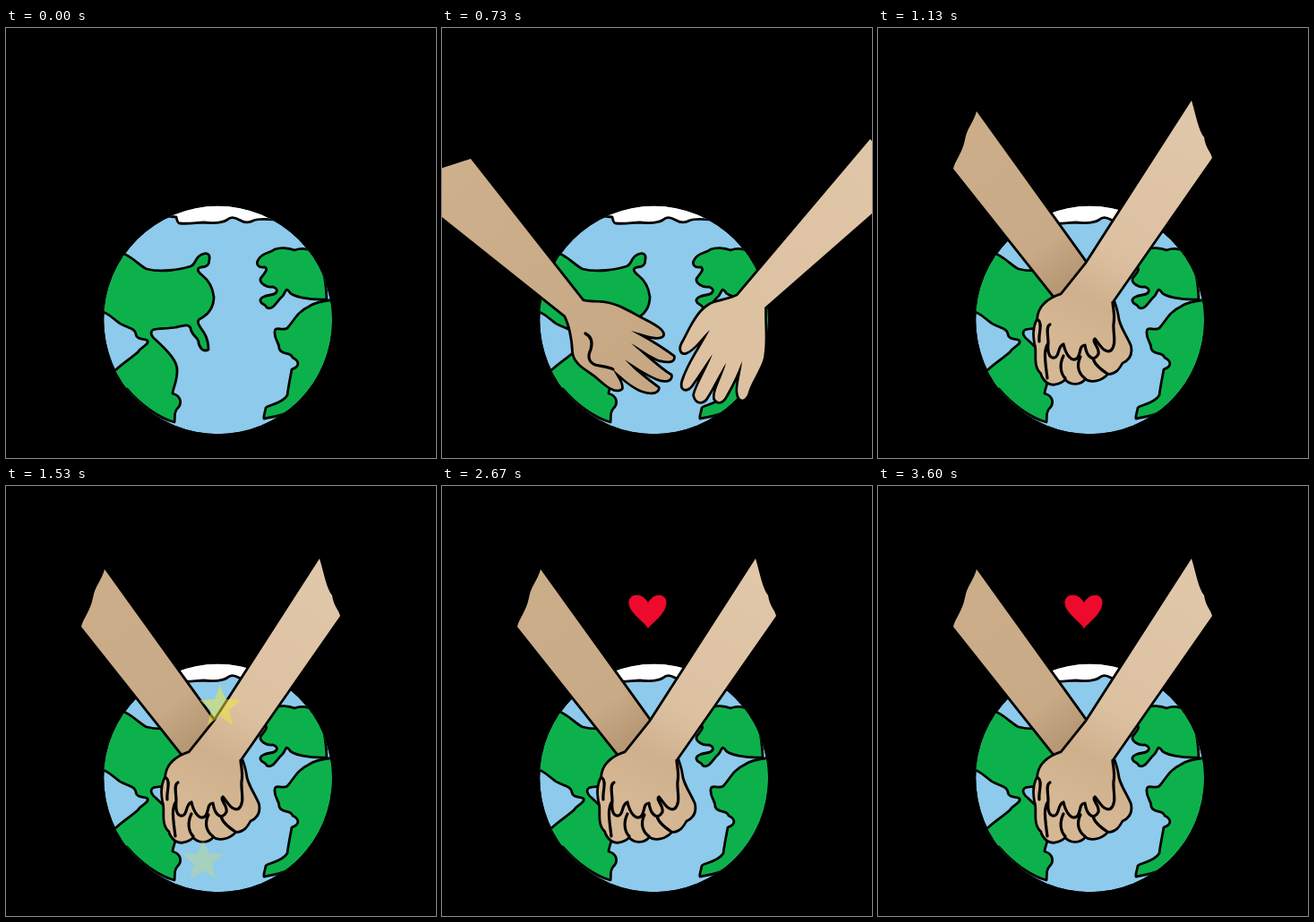
Recreate the animation shown at these times as an HTML page. Size 480 px wide and 480 px high, loop 3990 ms.

```html
<!DOCTYPE html>
<html lang="en">
<head>
<meta charset="utf-8">
<title>Holding hands over the Earth</title>
<style>
html, body { margin: 0; width: 100%; height: 100%; overflow: hidden; background: #000; }
svg { display: block; width: 100vw; height: 100vh; }
path { stroke-linecap: round; stroke-linejoin: round; }
.land path { fill: #0db14b; stroke: #000; stroke-width: 2.8; }
.arm { stroke: #000; stroke-width: 5.6; paint-order: stroke; }
.left { fill: url(#tan); }
.right { fill: url(#sand); }
.line { fill: none; stroke: #000; stroke-width: 3.2; }
.reach, .rest, .cover, .clasp, .heart, .star { animation: 3990ms step-end infinite; }
.slide { animation: 3990ms step-end infinite; }

/* One pose at a time */
.reach { animation-name: reach; }
.rest { animation-name: rest; }
.cover { animation-name: cover; }
.clasp { animation-name: clasp; }
@keyframes reach { 0%, 14.91%, 100% { visibility: hidden } 6.64% { visibility: visible } }
@keyframes rest { 0%, 21.68%, 100% { visibility: hidden } 14.91% { visibility: visible } }
@keyframes cover { 0%, 24.94%, 100% { visibility: hidden } 21.68% { visibility: visible } }
@keyframes clasp { 0% { visibility: hidden } 24.94%, 100% { visibility: visible } }

/* Stepped travel inside each pose */
.reach-l { animation-name: reach-l; }
.reach-r { animation-name: reach-r; }
.rest-l { animation-name: rest-l; }
.rest-r { animation-name: rest-r; }
.cover-l { animation-name: cover-l; }
.cover-r { animation-name: cover-r; }
.clasp-l { animation-name: clasp-l; }
@keyframes reach-l {
  0% { transform: translate(-120px, -42px) }
  8.15% { transform: translate(-80px, -28px) }
  9.9% { transform: translate(-38px, -13px) }
  11.65% { transform: none }
  13.16%, 100% { transform: translate(32px, 10px) }
}
@keyframes reach-r {
  0% { transform: translate(95px, -30px) }
  8.15% { transform: translate(62px, -20px) }
  9.9% { transform: translate(30px, -10px) }
  11.65% { transform: none }
  13.16%, 100% { transform: translate(-24px, 8px) }
}
@keyframes rest-l {
  0% { transform: translate(-44px, -20px) }
  16.67% { transform: translate(-20px, -9px) }
  18.17% { transform: none }
  19.92%, 100% { transform: translate(19px, -9px) }
}
@keyframes rest-r {
  0% { transform: translate(42px, -20px) }
  16.67% { transform: translate(20px, -9px) }
  18.17% { transform: none }
  19.92%, 100% { transform: translate(-27px, -6px) }
}
@keyframes cover-l { 0% { transform: none } 23.18%, 100% { transform: translate(14px, -9px) } }
@keyframes cover-r { 0% { transform: none } 23.18%, 100% { transform: translate(-12px, -5px) } }
@keyframes clasp-l { 0% { transform: translate(-7px, 1px) } 26.69%, 100% { transform: none } }

.star { fill: #f4e93c; opacity: 0; animation-name: twinkle; }
@keyframes twinkle {
  0%, 44.99%, 100% { opacity: 0 }
  33.2%, 43.23% { opacity: .12 }
  34.96%, 41.73% { opacity: .28 }
  36.72%, 39.97% { opacity: .42 }
  38.22% { opacity: .5 }
}

.heart { animation-name: show; }
.rise { animation: rise 3990ms linear infinite; }
@keyframes show { 0% { visibility: hidden } 46.74%, 100% { visibility: visible } }
@keyframes rise {
  0% { transform: translateY(126px) }
  45% { transform: translateY(126px); animation-timing-function: steps(12, jump-start) }
  65%, 100% { transform: none }
}
</style>
</head>
<body>
<svg viewBox="0 0 480 480">
  <defs>
    <clipPath id="disc"><circle cx="236.5" cy="326" r="127.3"/></clipPath>
    <linearGradient id="tan" x1="0" y1="0" x2="1" y2="1">
      <stop offset="0" stop-color="#cfb08c"/><stop offset="1" stop-color="#c6a783"/>
    </linearGradient>
    <linearGradient id="sand" x1="1" y1="0" x2="0" y2="1">
      <stop offset="0" stop-color="#e0c7a9"/><stop offset="1" stop-color="#dcc09f"/>
    </linearGradient>
    <linearGradient id="shade" gradientUnits="userSpaceOnUse" x1="100" y1="120" x2="215" y2="280">
      <stop offset="0" stop-color="#cbad89"/><stop offset=".75" stop-color="#c8aa86"/><stop offset="1" stop-color="#b79874"/>
    </linearGradient>
    <linearGradient id="fist" gradientUnits="userSpaceOnUse" x1="345" y1="100" x2="215" y2="350">
      <stop offset="0" stop-color="#e0c7a9"/><stop offset=".6" stop-color="#dcc1a1"/><stop offset=".82" stop-color="#cfb08d"/><stop offset="1" stop-color="#d5b794"/>
    </linearGradient>
    <path id="spark" d="M0-24 6-8 23-7 10 4 14 21 0 11-14 21-10 4-23-7-6-8Z"/>
  </defs>

  <g class="land" clip-path="url(#disc)">
    <circle cx="236.5" cy="326" r="127.3" fill="#8dcaeb"/>
    <path style="fill:#fff" d="M170 209 190 211C191 214 191 218 194 218C205 219 213 217 221 217C230 218 241 218 247 214C251 210 255 211 260 214C265 217 271 218 276 215C284 212 291 214 305 214L300 180H170Z"/>
    <path d="M125 249C142 255 147 264 157 269C172 273 194 270 206 266C212 264 211 256 218 253C224 250 228 252 227 258C227 264 225 267 218 267C212 268 214 272 219 276C228 283 231 292 232 300C232 312 226 320 216 325C212 328 216 333 221 340C224 345 226 352 226 359C220 362 217 358 215 352C216 346 207 344 206 335C203 329 198 333 190 334C180 336 170 335 164 337C160 340 163 345 167 348C180 360 192 372 191 383C191 395 186 403 186 408C197 411 196 421 191 425C187 430 189 435 188 440C172 436 150 421 135 403L90 400 120 384C128 376 139 369 147 362C151 355 160 354 158 349C155 346 146 349 145 342C144 334 132 334 126 329C120 325 116 319 104 315L95 260Z"/>
    <path d="M342 250C335 245 328 246 322 248C315 245 305 245 300 247C294 252 287 250 282 258C278 264 282 268 289 267C294 270 286 276 284 280C283 285 291 290 298 289C306 292 302 297 295 298C289 299 283 301 284 305C285 309 290 308 291 312C298 316 302 305 309 299C313 293 312 290 316 294C318 300 340 304 358 303C357 285 357 270 342 250Z"/>
    <path d="M370 303C355 304 345 306 338 311C325 317 322 326 314 335C308 339 299 331 300 341C300 348 305 351 305 358C308 366 318 361 320 368C328 372 328 378 319 381C317 392 315 402 314 410C308 420 291 421 290 424C289 430 287 434 288 436C300 434 306 433 314 429L400 430V303Z"/>
  </g>

  <g class="heart"><path class="rise" fill="#ee0a2c" stroke="#ee0a2c" d="M230 158C222 148 208 140 209 129C210 120 224 119 230 131C236 119 251 120 250 131C249 142 238 150 230 158Z"/></g>

  <g class="reach">
    <path class="arm left slide reach-l" d="M-120 175 0 243 38 266C55 270 65 275 75 281C95 289 122 297 139 307C145 313 141 318 133 317C121 316 110 314 99 312C112 322 134 335 149 346C153 352 148 355 141 353C126 348 110 339 96 331C107 345 124 362 137 378C138 385 133 387 127 382C112 370 97 355 85 342C91 358 101 378 107 397C107 404 101 403 97 398C83 379 72 357 58 342C50 336 43 341 41 349C40 363 38 376 34 387C30 391 27 389 27 383C29 355 27 328 21 303L17 295 0 285-120 232Z"/>
    <path class="arm right slide reach-r" d="M620 180 480 258 467 267C450 265 425 265 405 264C395 262 387 257 383 261C384 267 394 271 403 273C414 278 419 283 413 290C402 302 383 320 364 340C359 346 364 351 372 347C385 339 392 334 400 328C390 343 373 357 369 368C369 375 376 374 382 370C392 362 402 350 411 340C405 354 391 370 387 380C388 387 396 386 400 381C410 369 417 357 425 347C424 361 415 373 414 383C417 388 422 385 426 379C434 367 444 351 454 335C462 320 471 306 480 291L620 240Z"/>
  </g>

  <g class="rest">
    <g class="slide rest-l">
      <path class="arm left" d="M-27 165 32 146 157 305C165 307 172 306 180 307C197 309 211 319 225 326C235 331 248 338 246 343C242 347 232 344 222 341L211 338C226 346 245 357 258 367C259 373 250 372 242 370C232 366 222 358 211 352C225 364 242 380 255 388C256 394 247 394 240 391C226 385 216 378 204 370C215 383 232 395 241 402C240 408 230 407 222 404C211 399 202 391 191 381C194 388 201 396 200 402C194 407 184 399 175 391C166 382 149 377 147 362C146 345 143 331 138 321L0 211-27 180Z"/>
      <path class="line" d="M160 341C168 345 168 352 166 359C162 367 164 373 171 376C179 378 186 378 191 381"/>
    </g>
    <path class="arm right slide rest-r" d="M478 124 330 299C318 305 305 305 298 310C285 318 278 335 270 350C265 358 267 363 272 362C281 359 290 345 299 337C290 355 275 375 269 395C267 404 273 405 278 399C286 388 294 375 302 364C296 380 284 400 282 410C284 419 292 419 296 411C303 400 310 385 317 374C313 390 303 405 305 414C309 420 314 416 317 410C324 398 330 385 335 372C334 385 328 402 331 410C333 418 340 415 342 406C347 392 356 380 359 368C362 350 360 335 360 312L480 207 520 170Z"/>
  </g>

  <g class="cover">
    <g class="slide cover-l">
      <path class="arm left" d="M9 148C30 138 50 134 73 126L190 293C203 296 218 295 235 297L245 350 225 389C217 393 211 391 203 387C193 380 183 370 174 359C172 345 170 332 169 321Z"/>
      <path class="line" d="M191 327C199 332 203 340 199 348C192 355 199 360 210 366C216 369 219 371 222 373M200 358C205 367 213 374 221 379"/>
    </g>
    <path class="arm right slide cover-r" d="M395 97 269 288C258 289 245 289 236 295C223 304 219 321 214 338C210 350 214 355 220 352C230 346 235 331 241 319C235 340 221 365 218 385C217 394 223 395 228 390C236 378 240 367 247 357C243 375 233 392 232 402C234 411 241 410 244 402C250 390 255 375 260 362C260 378 252 392 254 401C257 407 263 404 266 397C272 385 274 372 277 360C281 372 277 388 280 398C284 404 289 400 291 392C294 375 304 358 305 345C306 330 301 310 299 298L430 154C420 134 405 118 395 97Z"/>
  </g>

  <g class="clasp">
    <path class="arm slide clasp-l" fill="url(#shade)" d="M110 93C107 105 99 112 97 125C94 140 86 148 84 157L200 303 245 282 233 264Z"/>
    <path class="arm" fill="url(#fist)" d="M350 81 233 263 205 298C190 303 180 311 179 325C174 334 174 345 177 356C178 367 175 378 183 385C185 393 192 399 200 396C204 395 207 393 209 390C214 398 226 398 231 390C239 396 250 392 256 385C266 385 269 378 272 373C279 370 283 364 281 355C277 345 268 333 267 322C266 315 264 310 262 304L373 145C371 137 366 135 364 122C358 115 355 98 350 81Z"/>
    <path class="line" d="M192 331C187 333 190 343 190 351C189 362 191 369 197 368C203 367 200 355 207 353C210 366 217 374 223 368C227 362 224 355 231 354C233 368 241 373 246 364C248 357 238 350 242 347C247 352 252 364 260 360C267 353 262 340 263 330C265 320 262 312 262 306M179 326C184 330 179 341 180 350M190 352C184 360 187 374 189 391M207 366C202 376 204 386 209 391M226 367C221 377 224 386 231 391M240 369C242 376 249 381 256 386"/>
    <use class="star" href="#spark" x="239" y="246"/>
    <g opacity=".5"><use class="star" href="#spark" x="220" y="418"/></g>
  </g>
</svg>
</body>
</html>
```
